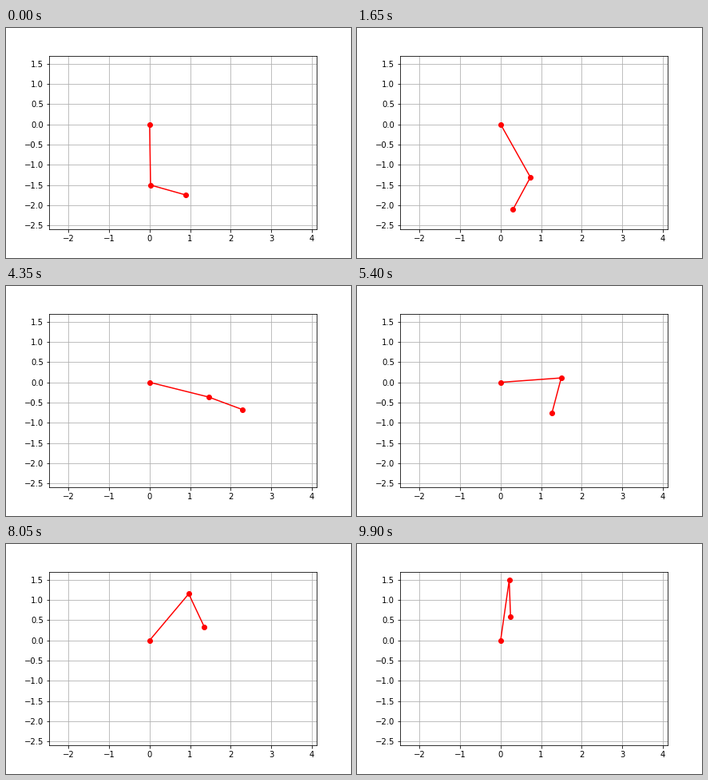
Write a matplotlib script that moves like this. It is 432 px wide and 288 px high and loops after 9950 ms.

```python
import numpy as np
import matplotlib.pyplot as plt
from matplotlib.animation import FuncAnimation

G = 9.8
L1, L2 = 1.5, 0.9      # driven arm, hanging pendulum
ARM_SPEED = 0.1        # rad/s
SAMPLES = 200
SUBSTEPS = 20

t = np.linspace(0, 30, SAMPLES)


def slope(state):
    angle, speed = state
    return np.array([speed, -G / L2 * np.sin(angle)])


def rk4(state, h):
    a = slope(state)
    b = slope(state + h / 2 * a)
    c = slope(state + h / 2 * b)
    d = slope(state + h * c)
    return state + h / 6 * (a + 2 * b + 2 * c + d)


def swing(start):
    """Pendulum angle from the vertical at every sample time."""
    h = (t[1] - t[0]) / SUBSTEPS
    state = np.array(start)
    angles = [state[0]]
    for _ in t[1:]:
        for _ in range(SUBSTEPS):
            state = rk4(state, h)
        angles.append(state[0])
    return np.array(angles)


arm = ARM_SPEED * t
bob = swing((np.pi / 2, -1.0))

elbow_x, elbow_y = L1 * np.sin(arm), -L1 * np.cos(arm)
tip_x, tip_y = elbow_x + L2 * np.sin(bob), elbow_y - L2 * np.cos(bob)

fig = plt.figure(figsize=(6, 4), dpi=72, facecolor="white")
ax = fig.add_axes([0.125, 0.125, 0.775, 0.755])
ax.set_xlim(-2.4818, 4.1206)
ax.set_ylim(-2.591, 1.697)
ax.set_xticks(np.arange(-2, 5))
ax.set_yticks(np.arange(-2.5, 2, 0.5))
ax.grid()

linkage, = ax.plot([], [], "o-", color="red", lw=1.5, ms=6)


def draw(frame):
    i = frame + 1
    linkage.set_data([0, elbow_x[i], tip_x[i]], [0, elbow_y[i], tip_y[i]])
    return linkage,


anim = FuncAnimation(fig, draw, frames=SAMPLES - 1, interval=50,
                     repeat=True, repeat_delay=0)
plt.show()
```
